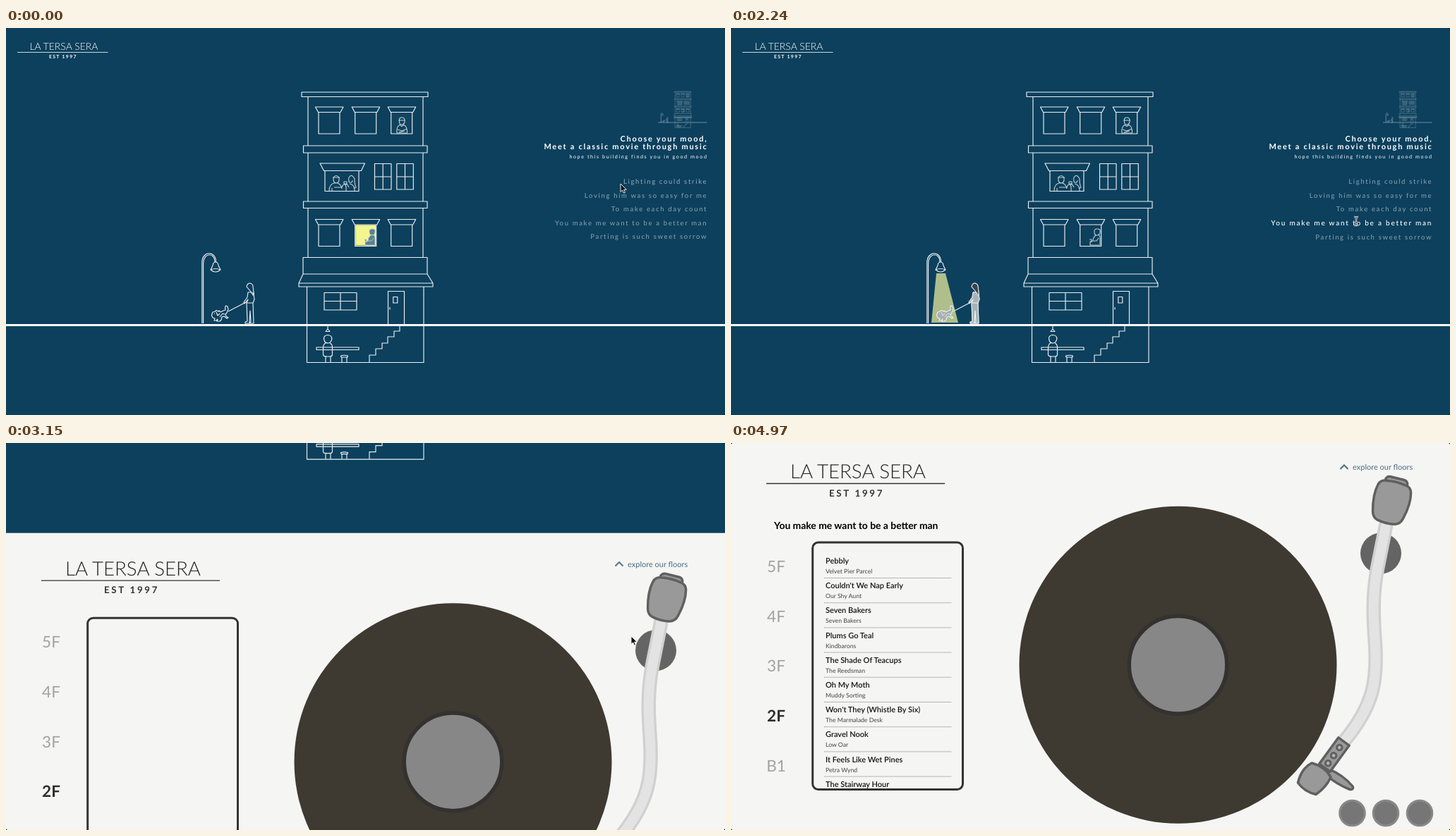
Write an HTML page that moves like this. It is 1019 px wide and 549 px high and loops after 6440 ms.

```html
<!DOCTYPE html>
<html lang="en">
<head>
<meta charset="utf-8">
<title>Music building</title>
<style>
  html, body { margin: 0; height: 100%; overflow: hidden; background: #222; }
  svg { display: block; width: 100vw; height: 100vh; border-radius: 3px; background: #0c405d; }
  text { font-family: Lato, "Open Sans", sans-serif; text-rendering: geometricPrecision; stroke: none; }
  .line { fill: none; stroke: #eceff1; stroke-width: 1.15; stroke-linejoin: round; }
  .end { text-anchor: end; fill: #fff; }
  .mid { text-anchor: middle; }
  .bold { font-weight: 700; }
  .thin { font-weight: 300; }
  .metal { fill: #999; stroke: #606060; stroke-width: 3.5; stroke-linejoin: round; }
</style>
</head>
<body>
<svg viewBox="0 0 1019 549">
  <defs>
    <clipPath id="boxClip"><rect x="117" y="142" width="210" height="348"/></clipPath>
    <path id="man5" d="M557.500 131q-.5-4 3.500-4t4 4v2.500q-1 3.500-4 3.500-3.500 0-3.500-3.500zM556 131h10M554 149q-1-9 4-11.500l3 2 3-2q5 2.500 4.500 11.500zM555 144l6 2 7-3M557 148l8-2"/>
    <path id="pair4" d="M464 212q4-5 8 0v4q-1 4-4 4t-4-4zM463 212h10M458 231q0-9 7-11h5q5 2 6 8M465 226h11l2-4M462 231v-4M486 212q4-6 8 2q0 8 2 12l-3 2M486 212q-1 5 1 7q4 1 4-3M482 231v-6l-2-4h3l3 5M487 221q7 1 7 10M479 218h4v4h-4z"/>
    <path id="sitter3" d="M515 290q-1-5 4-5t4 4q0 5-4 5t-4-4M517 294q-4 3-4 8l-4 1v5h14v-10q0-4-3-5M513 302h5l3-4M508 300h3v4"/>
    <path id="dog" d="M291.500 407l1.500-4 3-.5 2-2 3 1.500 1-1 2 2 4-2 3-1-.5-3.500 1-2.500 2.500 1 1 4-2 5-2 2 1 3 3 2-2 1-4-3-3 1-1 4-2 2h-4l1-3-2 2h-3l1-3-3-1-1-2z"/>
    <path id="walker" d="M343 375q6-1 8 2l1 8-2 5h-9l2-5-5 6-1-2 5-7zM341 390l1 26-3 1v2h6l1-18 1 16-2 2h6l-1-29"/>
    <path id="hair" d="M341 367q1-5 5-5 4 1 4 5l1 8q1 3-1 4l-3-5z"/>
    <path id="cone" d="M291 348h13l18 70h-38z"/>
    <path id="arm" d="M930 108L916 178C909 215 910 245 913 285C916 335 912 372 868 424"/>

    <g id="house">
      <path d="M419 91h179v6.500h-179zM428 97.500v69.500M591 97.500v69.500M421.500 167H597v10H421.500zM428 177v69M591 177v69M421.500 246H597v9.500H421.500zM428 255.500v70M591 255.500v70M421 325.500H597V349H421zM421 349l-6 13H605l-8-13M415 362H605v5H415zM426.500 367H592V474.500H426.500z"/>
      <g id="row"><path id="win" d="M438.500 112h39.500l-4 7.500h-31.500zM443 119.500h30V150h-30z"/><use href="#win" x="51.700"/><use href="#win" x="102.700"/></g>
      <use href="#row" y="159.500"/>
      <path d="M445 192h63.500l-5 10.500h-53zM452 202.500h48v29h-48z"/>
      <path id="pane" d="M522.500 192.500H546V229H522.500zM534.200 192.500V229M522.500 211H546"/><use href="#pane" x="31.300"/>
      <path d="M451 375.500h46V400h-46zM474 375.500V400M451 387.500h46M541.500 421V373.500h23V421M548.800 381.500h6v8.500h-6zM544 396v3.500"/>
      <path d="M558 422v8h-8v8h-9v9h-8v8h-9v9h-9v10"/>
      <path d="M456 423v4l-3 3.500h6l-3-3.500M440 453h60v3.500h-60z"/>
      <path d="M451 443q-2-7 5-7.500 7 .5 5.500 7-2 5-5.500 4.500-4 0-5-4zM453 447q-3 1-3.500 6v10q0 3 4 3h6q3 0 3-3v-10q0-4-3-6M453 474v-9M460 474v-9M452 466h9M474.500 465q5-1.500 10 0l-.5 2h-9zM476 467v7M483 467v7"/>
      <g opacity=".8"><use href="#man5"/><use href="#pair4"/><use href="#sitter3"/></g>
      <path d="M277.800 419V333C278 315 298 316 297.500 332M279.600 419V334C280 318 296 318 296 332M293 337q.5-5 4-5t4 5l3 6q-7 6-14 0zM290 343q7-3 14 0"/>
      <use href="#dog"/><path d="M295 405.500h1M298 403l2 5 3-3M303 410l4-5 3 1M315 402l25-13"/>
      <use href="#walker"/><use href="#hair"/>
    </g>
  </defs>

  <g id="page1">
    <text class="mid thin" x="82" y="31" font-size="14" fill="#fff">LA TERSA SERA</text>
    <path d="M16 34.500h128.500" stroke="#fff" stroke-width=".8"/>
    <text class="bold" x="61" y="43.300" font-size="6.800" letter-spacing="1.350" fill="#fff">EST 1997</text>

    <use href="#house" class="line"/>
    <g id="lights" stroke-linejoin="round">
      <g><rect x="546.500" y="120" width="28.500" height="29.500"/><use href="#man5" fill="#5b7f99" stroke="#dfe7cf" stroke-width=".8"/></g>
      <g><rect x="452.500" y="203" width="47" height="28"/><use href="#pair4" fill="#5b7f99" stroke="#41657d" stroke-width=".8"/></g>
      <g><rect x="495.300" y="279.500" width="28.700" height="29"/><use href="#sitter3" fill="#5b7f99" stroke="#c9d5b8" stroke-width=".8"/></g>
      <g><use href="#cone"/><use href="#dog" fill="#d6d6d0" stroke="#f2f2ee"/><use href="#walker" fill="#d8dada" stroke="#f2f2ee"/><use href="#hair" fill="#4a4546" stroke="#eee"/></g>
    </g>
    <path d="M0 421.500H1019" stroke="#fff" stroke-width="2.800"/>

    <g opacity=".4"><use href="#house" fill="none" stroke="#fff" style="stroke-width:4" transform="translate(890.900 77.850) scale(.134)"/><path d="M924 134h69.500" stroke="#fff"/></g>
    <g class="end bold" font-size="11" letter-spacing="1.730">
      <text x="994.500" y="161">Choose your mood,</text>
      <text x="994.500" y="172">Meet a classic movie through music</text>
    </g>
    <text class="end" x="994.500" y="185" font-size="7.200" letter-spacing="1.570">hope this building finds you in good mood</text>
    <g id="moods" class="end" font-weight="500"></g>
  </g>

  <g id="page2">
    <rect y="-10" width="1019" height="575" fill="#f5f5f3"/>
    <text class="mid thin" x="180" y="50" font-size="27.700" fill="#222">LA TERSA SERA</text>
    <path d="M50 57.500h253" stroke="#333" stroke-width="1.300"/>
    <text class="bold" x="139" y="75.500" font-size="13.300" letter-spacing="2.700" fill="#333">EST 1997</text>
    <text id="chosen" class="bold" x="61" y="121.700" font-size="13.900">You make me want to be a better man</text>
    <g id="player">
      <rect x="115.700" y="141" width="212.800" height="350.500" rx="8" fill="none" stroke="#333331" stroke-width="3"/>
      <g id="floors" class="mid" font-size="22.500"></g>
      <g clip-path="url(#boxClip)"><g id="songs"></g></g>
    </g>
    <path d="M863.500 37l5.500-5.500 5.500 5.500" fill="none" stroke="#4b6d85" stroke-width="2"/>
    <text x="881" y="38" font-size="11" fill="#4b6d85">explore our floors</text>
    <circle cx="633.500" cy="314.700" r="225" fill="#3e3931"/>
    <circle cx="633.500" cy="314.700" r="69.300" fill="#878787" stroke="#333230" stroke-width="5.500"/>
    <circle cx="921" cy="156.500" r="29" fill="#646464"/>
    <g fill="none">
      <use href="#arm" stroke="#d0d0d0" stroke-width="20.500"/>
      <use href="#arm" stroke="#e3e3e3" stroke-width="14"/>
    </g>
    <g class="metal">
      <g transform="rotate(14 936 82)">
        <rect x="920.500" y="49" width="32" height="14" rx="6"/>
        <path d="M921 56Q936 53 951 56Q958 57 960 64Q964 80 958 103Q956 111 949 113Q936 116 923 113Q916 111 914 103Q908 80 912 64Q914 57 921 56z"/>
      </g>
      <path d="M846 462Q868 471 881 487Q883 492 877 491.500Q858 484 842 470z"/>
      <path d="M823 454Q842 459 850 474Q844 488 829 498.500Q813 495 803.500 482Q808 462 823 454z"/>
      <g transform="translate(868.500 423.500) rotate(36)">
        <rect x="-9.500" y="0" width="19" height="46"/>
        <g stroke-width="3" fill="#b5b5b5"><circle cy="10.500" r="3.800"/><circle cy="24.500" r="3.800"/><circle cy="38" r="3.800"/></g>
      </g>
    </g>
    <g fill="#767676" stroke="#888" stroke-width="3">
      <circle cx="880.500" cy="525" r="17.800"/><circle cx="928" cy="525" r="17.800"/><circle cx="976" cy="525" r="17.800"/>
    </g>
  </g>

  <g id="cursor">
    <path id="arrow" d="M0 0v11.500l2.700-2.500 1.800 4.200 2-.9-1.800-4h3.600z" fill="#111" stroke="#fff" stroke-width=".9"/>
    <g id="beam" fill="none">
      <path id="ibeam" d="M-3-6q3 0 3 2v8q0 2-3 2M3-6q-3 0-3 2M3 6q-3 0-3-2M-2 2h4" stroke-width="2.400" stroke="#e8ecee"/>
      <path d="M-3-6q3 0 3 2v8q0 2-3 2M3-6q-3 0-3 2M3 6q-3 0-3-2M-2 2h4" stroke-width=".8" stroke="#223"/>
    </g>
  </g>
</svg>
<script>
const LOOP = 6440, STEP = 70, SCROLL = 589;
const $ = id => document.getElementById(id);
const clamp = v => Math.max(0, Math.min(1, v));

// [enter, leave] times of the pointer; lit adds a light still on when the loop opens
const moods = [
  { text: "Lighting could strike", hover: [[-20, 690]] },
  { text: "Loving him was so easy for me", hover: [[720, 1040]] },
  { text: "To make each day count", hover: [[1260, 1715]], lit: [[-1000, 0]] },
  { text: "You make me want to be a better man", hover: [[1715, 2900]] },
  { text: "Parting is such sweet sorrow", hover: [] }
];
const songs = [
  ["Pebbly", "Velvet Pier Parcel"],
  ["Couldn't We Nap Early", "Our Shy Aunt"],
  ["Seven Bakers", "Seven Bakers"],
  ["Plums Go Teal", "Kindbarons"],
  ["The Shade Of Teacups", "The Reedsman"],
  ["Oh My Moth", "Muddy Sorting"],
  ["Won't They (Whistle By Six)", "The Marmalade Desk"],
  ["Gravel Nook", "Low Oar"],
  ["It Feels Like Wet Pines", "Petra Wynd"],
  ["The Stairway Hour", ""]
];
// Pointer path: time, x, y
const path = [
  [0, 871, 221], [690, 874, 228], [1040, 884, 246], [1400, 891, 261],
  [1715, 888, 268], [2170, 886, 274], [3990, 886, 274], [4690, 574, 516], [4970, 508, 556]
];

$("moods").innerHTML = moods.map(m => `<text>${m.text}</text>`).join("");
$("floors").innerHTML = ["5F", "4F", "3F", "2F", "B1"].map((f, i) =>
  `<text x="64" y="${183 + i * 70.7}" ${f === "2F" ? 'class="bold" fill="#2e2e2e"' : 'fill="#a3a3a3"'}>${f}</text>`).join("");
$("songs").innerHTML = songs.map(([name, film], i) => `<g transform="translate(0 ${i * 35.2})">
  <text x="134" y="171" font-size="11" font-weight="600" fill="#111">${name}</text>
  <text x="134" y="185" font-size="8.700" fill="#444">${film}</text>
  <path d="M132 191.500h180.500" stroke="#777" stroke-dasharray="1 1"/></g>`).join("");

// cubic-bezier(.25, .1, .25, 1)
function ease(p) {
  let lo = 0, hi = 1, s = clamp(p);
  if (s === 0 || s === 1) return s;
  const curve = (a, b) => 3 * (1 - s) ** 2 * s * a + 3 * (1 - s) * s * s * b + s ** 3;
  for (let i = 0; i < 24; i++) {
    s = (lo + hi) / 2;
    if (curve(.25, .25) < p) lo = s; else hi = s;
  }
  return curve(.1, 1);
}

// Rises while hovered, falls back at the same rate
function glow(t, spans, dur) {
  return Math.max(0, ...spans.map(([on, off]) =>
    clamp((Math.min(t, off) - on) / dur) - Math.max(0, t - off) / dur));
}

function pointer(t) {
  const i = path.findIndex(k => k[0] > t);
  if (i < 0) return path.at(-1).slice(1);
  const [a, b] = [path[i - 1], path[i]];
  let p = (t - a[0]) / (b[0] - a[0]);
  if (a[0] === 3990) p = p * p * (3 - 2 * p);
  return [a[1] + (b[1] - a[1]) * p, a[2] + (b[2] - a[2]) * p];
}

function draw(t) {
  let push = 0;
  moods.forEach(({ hover, lit = [] }, i) => {
    const h = glow(t, hover, 300), size = 9.5 * (1 + .06 * h), el = $("moods").children[i];
    el.setAttribute("x", 992.5 + size * .175);
    el.setAttribute("y", 221.4 + i * 19.4 + push + h * .6);
    el.style.fontSize = size + "px";
    el.style.letterSpacing = size * .175 + "px";
    el.style.opacity = .48 + .52 * h;
    push += h;
    const light = $("lights").children[i];
    if (light) {
      const a = glow(t, [...lit, ...hover], 700);
      light.style.opacity = a;
      light.firstElementChild.style.fill = `hsl(62 ${a * 85}% 76%)`;
    }
  });

  const scroll = SCROLL * ease((t - 2830.4) / 686);
  $("page1").setAttribute("transform", `translate(0 ${-scroll})`);
  $("page2").setAttribute("transform", `translate(0 ${SCROLL - scroll})`);
  $("player").setAttribute("transform", `translate(0 ${t < 3360 ? -30.5 : 0})`);
  $("chosen").style.opacity = clamp((t - 3360) / 300);
  $("songs").style.opacity = clamp((t - 3600) / 250);

  const overText = t >= STEP && t < 2870;
  $("arrow").style.display = overText ? "none" : "";
  $("beam").style.display = overText ? "" : "none";
  $("cursor").setAttribute("transform", `translate(${pointer(t)})`);
}

const start = performance.now();
function tick() {
  const t = (performance.now() - start) % LOOP;
  draw(Math.min(4970, Math.floor(t / STEP) * STEP));
  requestAnimationFrame(tick);
}
tick();
</script>
</body>
</html>
```
